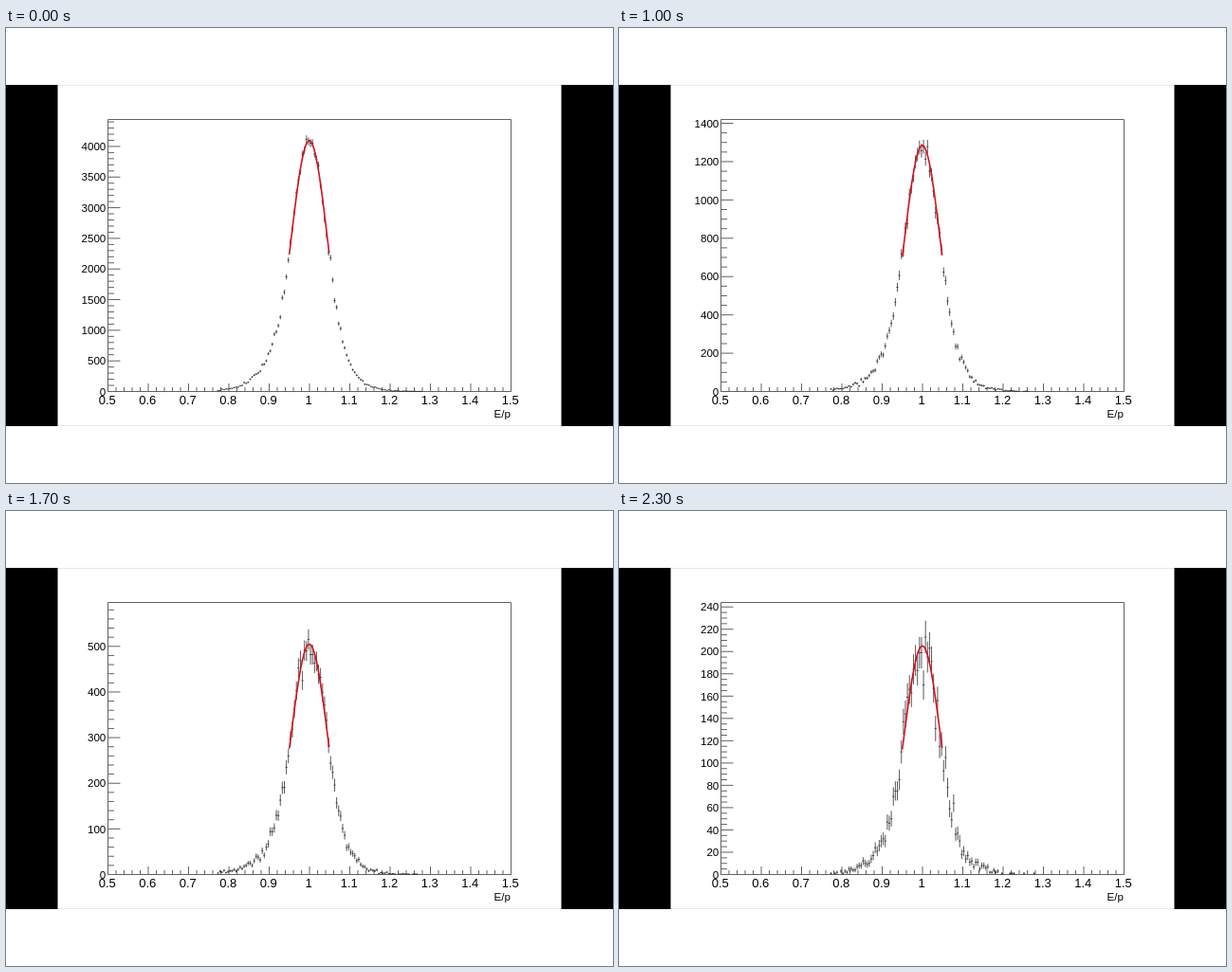
An HTML page with a canvas for the animation above (2.4 s loop, 640 by 480 pixels).

```html
<!DOCTYPE html>
<html lang="en">
<head>
<meta charset="utf-8">
<title>E/p histogram</title>
<style>
html, body { margin: 0; width: 100%; height: 100%; overflow: hidden; background: #fff; }
canvas { display: block; }
</style>
</head>
<body>
<canvas id="stage" width="640" height="480"></canvas>
<script>
const ctx = document.getElementById('stage').getContext('2d');
const STEP = 100, STEPS = 24;
const LEFT = 107.5, RIGHT = 532.5, TOP = 96.5, BASE = 383.5;
const BIN = 2.12, SIGMA = 19.2, MID = 319.8, FIT_FROM = 298.7, FIT_TO = 340.7;

// [step, fit height, axis maximum], with exponential decay between them
const keys = [
  [0, 4095, 4440], [3, 3175, 3409], [7, 1840, 2013], [10, 1285, 1420],
  [14, 735, 815], [19, 393, 484], [23, 205, 244]
];

const mix = (a, b, k) => a + (b - a) * k;
const logMix = (a, b, k) => a * Math.pow(b / a, k);

function scaleAt(step) {
  const i = Math.max(1, keys.findIndex(key => key[0] >= step));
  const [s0, peak0, max0] = keys[i - 1], [s1, peak1, max1] = keys[i];
  const k = (step - s0) / (s1 - s0);
  return { peak: logMix(peak0, peak1, k), max: logMix(max0, max1, k) };
}

const gauss = x => Math.exp(-(((x - MID) / SIGMA) ** 2) / 2);

// Gaussian core that runs on smoothly into an exponential tail on each side
function shape(x) {
  const d = Math.abs(x - MID) / SIGMA, edge = x < MID ? 1.15 : 1.45;
  return d < edge ? gauss(x) : Math.exp(edge * edge / 2 - edge * d);
}

function random(seed) {
  return () => {
    seed = seed + 0x6D2B79F5 | 0;
    let t = Math.imul(seed ^ seed >>> 15, 1 | seed);
    t = t + Math.imul(t ^ t >>> 7, 61 | t) ^ t;
    return ((t ^ t >>> 14) >>> 0) / 4294967296;
  };
}

function line(x0, y0, x1, y1) {
  ctx.moveTo(x0, y0);
  ctx.lineTo(x1, y1);
}

function stroke(color, width, path) {
  ctx.strokeStyle = color;
  ctx.lineWidth = width;
  ctx.beginPath();
  path();
  ctx.stroke();
}

function label(text, x, y, size, align) {
  ctx.font = size + 'px "Liberation Sans", Arial, sans-serif';
  ctx.textAlign = align;
  ctx.fillText(text, x, y);
}

function majorStep(max) {
  const raw = max / 10, unit = 10 ** Math.floor(Math.log10(raw)), lead = raw / unit;
  const round = lead <= 1 ? 1 : lead <= 2.5 ? 2 : lead <= 5 ? 5 : 10;
  return { size: round * unit, parts: round === 2 ? 4 : 5 };
}

function drawBackdrop() {
  ctx.fillStyle = '#fff';
  ctx.fillRect(0, 0, 640, 480);
  ctx.fillStyle = '#e8e8e8';
  ctx.fillRect(55, 60, 530, 1);
  ctx.fillRect(55, 419, 530, 1);
  ctx.fillStyle = '#000';
  ctx.fillRect(0, 60, 54.5, 360);
  ctx.fillRect(585.5, 60, 54.5, 360);
}

function drawAxes(max, yOf) {
  const { size, parts } = majorStep(max);
  const count = Math.floor(max / size * parts);
  ctx.fillStyle = '#000';
  stroke('#626262', 1, () => {
    ctx.rect(LEFT, TOP, RIGHT - LEFT, BASE - TOP);
    for (let i = 0; i <= count; i++) {
      const y = yOf(i * size / parts), major = i % parts === 0;
      line(LEFT, y, LEFT + (major ? 13 : 6.5), y);
      if (major) label(Math.round(i / parts * size), 105.3, y + 4.2, 11.6, 'right');
    }
    for (let i = 0; i <= 50; i++) {
      const x = mix(LEFT, RIGHT, i / 50), major = i % 5 === 0;
      line(x, BASE, x, BASE - (major ? 8.5 : 4.5));
      if (major) label(String((5 + i / 5) / 10), x - .8, 397, 13, 'center');
    }
  });
  label('E/p', 532, 411, 11.6, 'right');
}

function drawData(step, peak, yOf) {
  const rnd = random(step * 977 + 13);
  stroke('#222', .75, () => {
    for (let i = 54; i < 156; i++) {
      const x = 109.06 + BIN * i, mean = peak * shape(x);
      const noise = (rnd() + rnd() + rnd() + rnd() - 2) * 1.6;
      const n = Math.round(mean + noise * Math.sqrt(mean));
      if (n < 1) continue;
      const y = yOf(n), err = Math.sqrt(n);
      line(x - BIN / 2, y, x + BIN / 2, y);
      line(x, yOf(n + err), x, yOf(n - err));
    }
  });
}

function drawFit(peak, yOf) {
  ctx.lineJoin = 'round';
  stroke('#d8101e', 1.6, () => {
    for (let i = 0; i <= 40; i++) {
      const x = mix(FIT_FROM, FIT_TO, i / 40);
      ctx.lineTo(x, yOf(peak * gauss(x)));
    }
  });
}

function draw(step) {
  const { peak, max } = scaleAt(step);
  const yOf = v => mix(BASE, TOP, v / max);
  drawBackdrop();
  drawAxes(max, yOf);
  drawData(step, peak, yOf);
  drawFit(peak, yOf);
}

const start = performance.now();
function tick() {
  draw(Math.floor((performance.now() - start) / STEP) % STEPS);
  requestAnimationFrame(tick);
}
tick();
</script>
</body>
</html>
```
